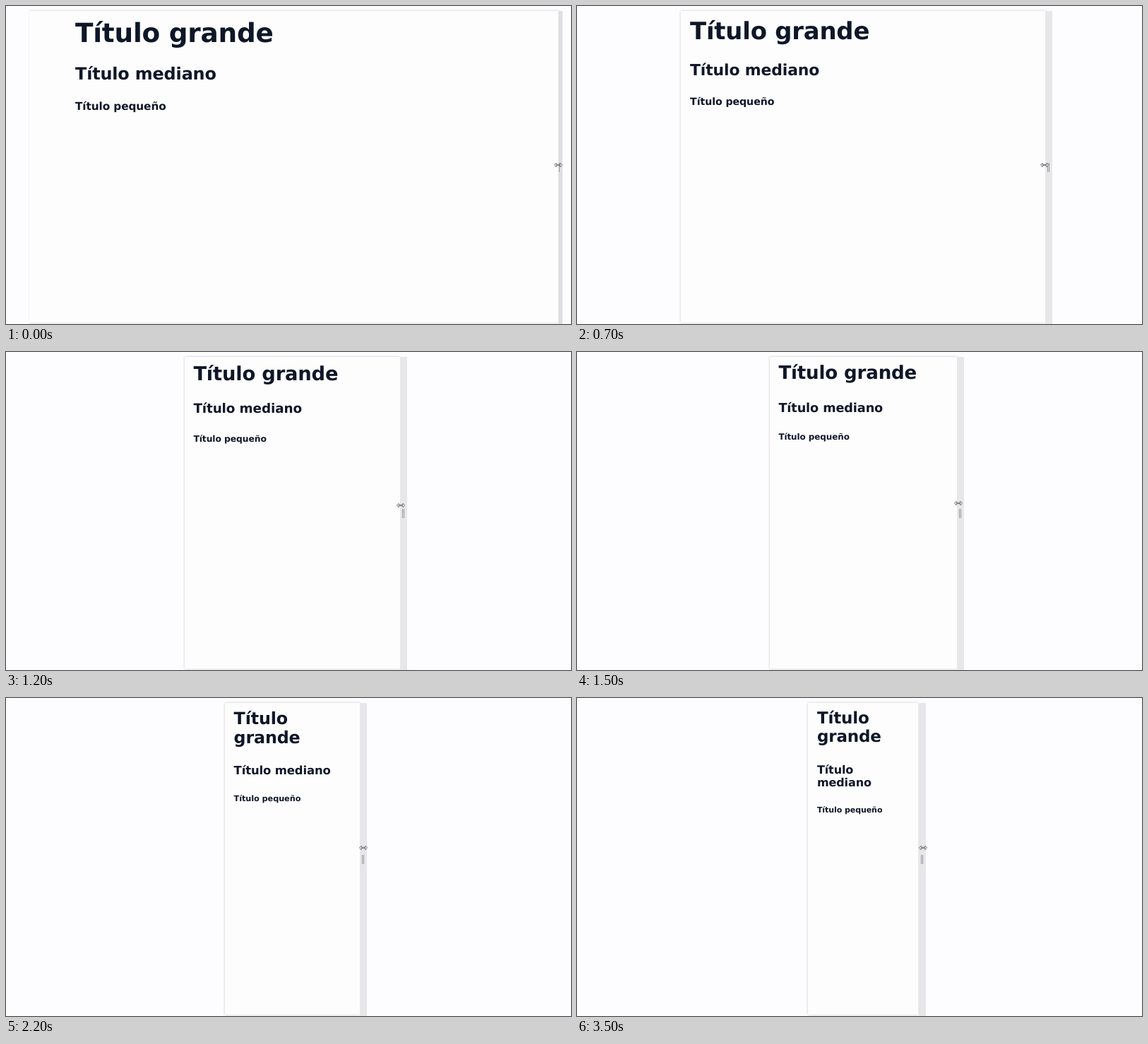
These frames come from a looping animation (800 by 450 pixels, 3700 ms). An HTML page:

```html
<!DOCTYPE html>
<html lang="es">
<head>
<meta charset="utf-8">
<title>Tipografía fluida</title>
<style>
  /* --r: right edge of the resizable frame; --dx, --cy: pointer position */
  @property --r { syntax: "<length>"; inherits: true; initial-value: 788px; }
  @property --dx { syntax: "<length>"; inherits: true; initial-value: -6.5px; }
  @property --cy { syntax: "<length>"; inherits: true; initial-value: 224.5px; }
  @property --grip { syntax: "<length>"; inherits: true; initial-value: 6px; }
  @property --tone { syntax: "<color>"; inherits: true; initial-value: #dde0e2; }
  @property --bleed { syntax: "<length>"; inherits: true; initial-value: 0px; }

  html, body { margin: 0; width: 100%; height: 100%; overflow: hidden; background: #fdfcfe; }

  .stage {
    position: relative;
    width: 800px;
    height: 450px;
    overflow: hidden;
    animation: resize 3700ms infinite, look 3700ms step-end infinite;
  }

  .page, .grip, .pointer { position: absolute; }

  .page {
    --left: calc(820.6px - var(--r));
    --w: calc(var(--r) - 10px - var(--left));
    left: var(--left);
    top: 7px;
    width: calc(var(--r) - var(--grip) - var(--left));
    height: 441px;
    background: #fefdfe;
    box-shadow: 0 0 3px rgba(0, 0, 0, .22);
    clip-path: inset(-5px -5px -5px var(--bleed));
  }

  .text {
    --inner: min(614.6px, var(--w) - 25.6px);
    position: absolute;
    left: calc((var(--w) - var(--inner)) / 2);
    top: 8.1px;
    width: var(--inner);
    color: #0e1728;
    font-family: Verdana, "DejaVu Sans", sans-serif;
    font-kerning: none;
    text-rendering: geometricPrecision;
  }

  h1, h2, h3 {
    position: relative;
    top: .05em;
    margin: 0 0 24.2px;
    font-weight: 700;
    line-height: 1.14;
    letter-spacing: -.006em;
  }
  h1 { font-size: clamp(23px, 17.83px + .0311 * var(--w), 37.4px); }
  h2 { font-size: clamp(16px, 13.2px + .0169 * var(--w), 23.9px); }
  h3 { font-size: clamp(11px, 9.56px + .009 * var(--w), 15.3px); }

  .grip {
    left: calc(var(--r) - var(--grip));
    top: 7px;
    width: var(--grip);
    height: 443px;
    overflow: hidden;
    background: var(--tone);
  }
  .grip::after {
    content: "";
    position: absolute;
    right: 4px;
    top: 215px;
    width: 1px;
    height: 13px;
    border: solid #98999c;
    border-width: 0 1px;
  }

  .pointer {
    left: calc(var(--r) + var(--dx) - 7px);
    top: calc(var(--cy) - 4px);
    width: 14px;
    height: 8px;
  }

  @keyframes resize {
    0%       { --r: 788px;   --dx: -6.5px;  --cy: 224.5px; animation-timing-function: steps(4, end); }
    10.8108% { --r: 749px;   --dx: -11.5px; --cy: 228px;   animation-timing-function: steps(2, end); }
    16.2162% { --r: 690px;   --dx: -11px;   --cy: 226px;   animation-timing-function: steps(3, end); }
    24.3243% { --r: 640px;   --dx: -10.5px; --cy: 222.5px; animation-timing-function: steps(3, end); }
    32.4324% { --r: 568px;   --dx: -9px;    --cy: 217px;   animation-timing-function: steps(3, end); }
    40.5405% { --r: 548px;   --dx: -8px;    --cy: 213.5px; animation-timing-function: steps(3, end); }
    48.6486% { --r: 525px;   --dx: -6.5px;  --cy: 212.5px; animation-timing-function: steps(1, end); }
    51.3513% { --r: 522.5px; --dx: -6px;    --cy: 212.5px; animation-timing-function: steps(5, end); }
    64.8648% { --r: 503px;   --dx: -4px;    --cy: 212px; }
    78.3783% { --r: 503px;   --dx: -4px;    --cy: 212px;   animation-timing-function: steps(5, end); }
    91.8918%, 100% { --r: 493.5px; --dx: -4px; --cy: 212px; }
  }

  @keyframes look {
    0% { --grip: 6px; --tone: #dde0e2; --bleed: 0px; }
    16.2162%, 100% { --grip: 10px; --tone: #e7e6e8; --bleed: -5px; }
  }
</style>
</head>
<body>
<div class="stage">
  <div class="page">
    <div class="text">
      <h1>Título grande</h1>
      <h2>Título mediano</h2>
      <h3>Título pequeño</h3>
    </div>
  </div>
  <div class="grip"></div>
  <svg class="pointer" viewBox="-7 -4 14 8">
    <path d="M-5.6 0L-2.9 -2.7V-.7H2.9V-2.7L5.6 0L2.9 2.7V.7H-2.9V2.7Z"
          fill="#fff" stroke="#4a4a4d" stroke-width=".8"/>
  </svg>
</div>
</body>
</html>
```
